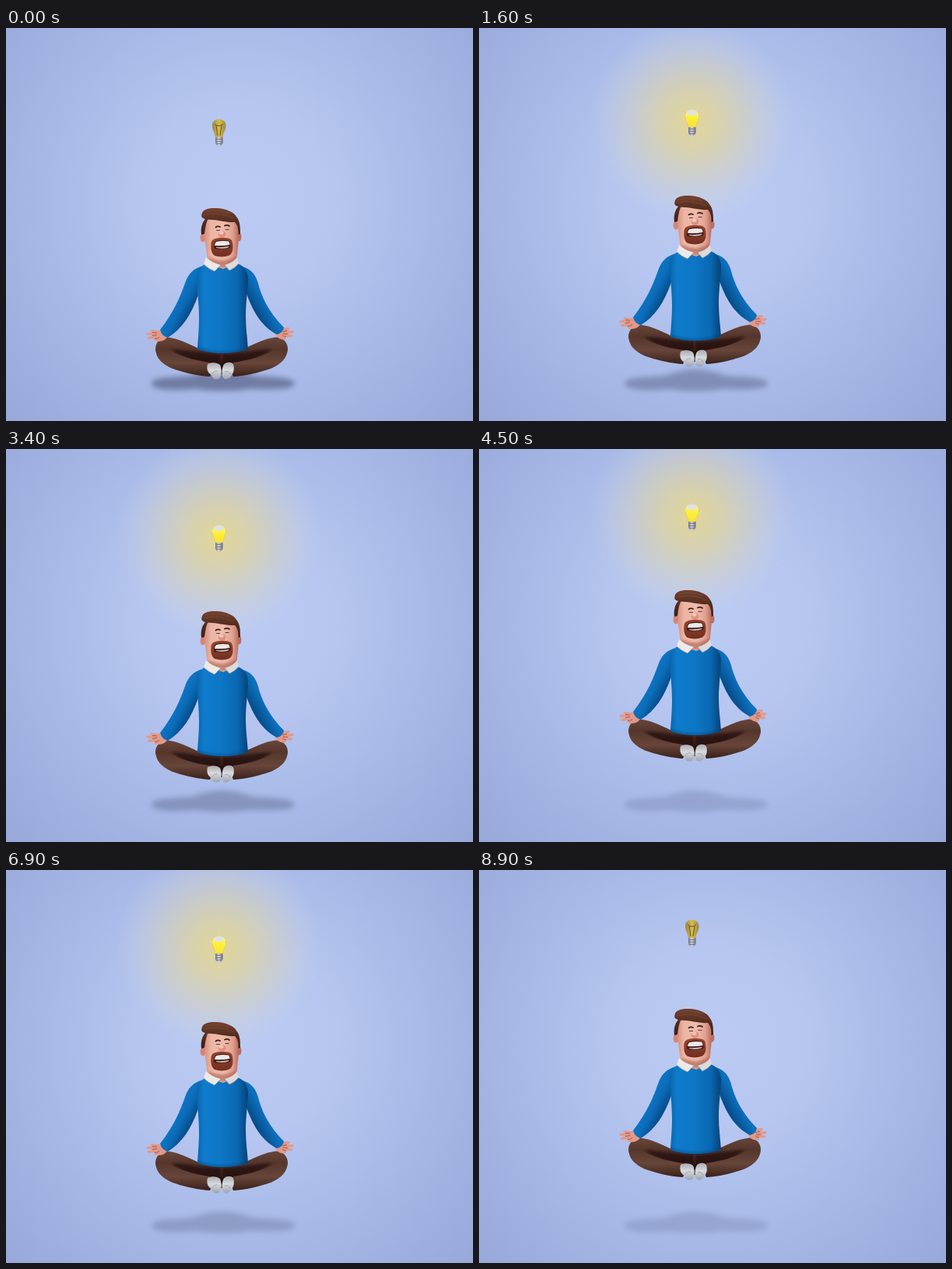
Write an HTML page that moves like this. It is 600 px wide and 504 px high and loops after 9 s.

```html
<!DOCTYPE html>
<html lang="en">
<head>
<meta charset="utf-8">
<title>Levitation</title>
<style>
  html, body { margin: 0; width: 100%; height: 100%; overflow: hidden; }
  body { background: radial-gradient(circle at 50% 44%, #bccbf3 0, #b6c6f0 30%, #a9bae8 58%, #9fb0e0 82%, #97a8d9 100%); }
  svg { display: block; width: 100%; height: 100%; }
  #glow, #lit { animation: shine 9s linear infinite; }
  @keyframes shine {
    0%, 1.2% { opacity: 0; }
    10%, 90% { opacity: 1; }
    97.8%, 100% { opacity: 0; }
  }
</style>
</head>
<body>
<svg viewBox="0 0 600 504">
  <defs>
    <radialGradient id="halo">
      <stop offset="0" stop-color="#ead885" stop-opacity=".84"/>
      <stop offset=".3" stop-color="#e5d694" stop-opacity=".68"/>
      <stop offset=".56" stop-color="#dfd5ae" stop-opacity=".46"/>
      <stop offset=".8" stop-color="#d4d5d2" stop-opacity=".24"/>
      <stop offset="1" stop-color="#c8d3f0" stop-opacity="0"/>
    </radialGradient>
    <linearGradient id="skin">
      <stop offset="0" stop-color="#d58d7c"/>
      <stop offset=".2" stop-color="#ecb5a4"/>
      <stop offset=".55" stop-color="#efbbab"/>
      <stop offset=".82" stop-color="#e0a090"/>
      <stop offset="1" stop-color="#b56a5c"/>
    </linearGradient>
    <linearGradient id="hair" x2="0" y2="1">
      <stop offset="0" stop-color="#74422f"/>
      <stop offset=".5" stop-color="#542d20"/>
      <stop offset="1" stop-color="#3b1f18"/>
    </linearGradient>
    <linearGradient id="beard" x2="0" y2="1">
      <stop offset="0" stop-color="#98452e"/>
      <stop offset="1" stop-color="#702f20"/>
    </linearGradient>
    <linearGradient id="torso">
      <stop offset="0" stop-color="#0a64ac"/>
      <stop offset=".14" stop-color="#0f7bcb"/>
      <stop offset=".5" stop-color="#0d76c5"/>
      <stop offset=".8" stop-color="#0a68b2"/>
      <stop offset="1" stop-color="#064278"/>
    </linearGradient>
    <linearGradient id="armL" x1=".2" y1=".2" x2=".75" y2=".65">
      <stop offset="0" stop-color="#1281d2"/>
      <stop offset=".6" stop-color="#0b6dba"/>
      <stop offset="1" stop-color="#063f76"/>
    </linearGradient>
    <linearGradient id="armR" x1=".8" y1=".2" x2=".25" y2=".65">
      <stop offset="0" stop-color="#0b69b4"/>
      <stop offset=".5" stop-color="#0c71be"/>
      <stop offset="1" stop-color="#063f76"/>
    </linearGradient>
    <linearGradient id="leg" x2="0" y2="1">
      <stop offset="0" stop-color="#68463b"/>
      <stop offset=".45" stop-color="#53342a"/>
      <stop offset="1" stop-color="#2d1812"/>
    </linearGradient>
    <linearGradient id="shin" x2="0" y2="1">
      <stop offset="0" stop-color="#56372c"/>
      <stop offset=".5" stop-color="#67453a"/>
      <stop offset="1" stop-color="#3a211a"/>
    </linearGradient>
    <linearGradient id="sock" x2="0" y2="1">
      <stop offset="0" stop-color="#a9abb0"/>
      <stop offset=".45" stop-color="#d8dade"/>
      <stop offset="1" stop-color="#9da1ad"/>
    </linearGradient>
    <linearGradient id="metal">
      <stop offset="0" stop-color="#73768a"/>
      <stop offset=".45" stop-color="#d3d6e0"/>
      <stop offset="1" stop-color="#6b6e7c"/>
    </linearGradient>
    <linearGradient id="dim">
      <stop offset="0" stop-color="#97874c"/>
      <stop offset=".5" stop-color="#d9ba45"/>
      <stop offset="1" stop-color="#9c8842"/>
    </linearGradient>
    <linearGradient id="bright" x2="0" y2="1">
      <stop offset="0" stop-color="#dcdcd0"/>
      <stop offset=".25" stop-color="#f3ec96"/>
      <stop offset=".45" stop-color="#fff136"/>
      <stop offset="1" stop-color="#f8e23a"/>
    </linearGradient>
    <filter id="soft" x="-20%" y="-60%" width="140%" height="220%"><feGaussianBlur stdDeviation="3.5"/></filter>
    <filter id="smooth" x="-40%" y="-40%" width="180%" height="180%"><feGaussianBlur stdDeviation="1.6"/></filter>

    <path id="glass" d="M265 126C264.500 120 268.500 117 273.500 117S283 120 282.500 126C282 132 279 134 278.500 140H269C268.500 134 265.500 132 265 126Z"/>
    <g id="half">
      <path fill="url(#leg)" d="M252 413C238 407 222 398 207 396.500C197 397 192 404 192 412C193 422 201 430 216 434L278 432V413Z"/>
      <path fill="#23110c" opacity=".7" filter="url(#smooth)" d="M213 412C230 412 250 418 276 418V432C252 430 226 424 213 412Z"/>
      <path fill="url(#shin)" d="M192.500 413C200 411 208 412 216 416C230 423 247 427 262 429Q265 438 262 447C245 446 229 442 213 436.500C199 430 193 423 192.500 413Z"/>
      <path fill="none" stroke="#2b1610" stroke-width="1.200" opacity=".6" d="M262 430Q264.500 438 262 446"/>
    </g>
  </defs>

  <g id="shadow" fill="#465073" filter="url(#soft)">
    <path d="M187 456C187 448 214 448 238 446C256 440 265 438 279 438S304 441 318 446C344 448 371 448 371 456S340 464 314 463Q278 468 244 463C214 466 187 464 187 456Z"/>
  </g>

  <g id="float">
    <circle id="glow" cx="274" cy="136" r="134" fill="url(#halo)"/>
    <g id="bulb">
      <use href="#glass" fill="url(#dim)"/>
      <path d="M270 125l2 13m5-13l-2 13M268 123q6 5 11 0" fill="none" stroke="#5d5436" stroke-width="1"/>
      <g id="lit">
        <use href="#glass" fill="url(#bright)"/>
        <path d="M268 121Q273.500 116.500 279 121L276 125H271Z" fill="#dde1ec"/>
      </g>
      <path d="M269 140H278.500V147.500Q277 151.500 273.700 151.500T269 147.500Z" fill="url(#metal)"/>
      <path d="M269 142.500h9.500M269 145.500h9.500M270 148.500h7.500" stroke="#6a6d7b" stroke-width=".8"/>
    </g>

    <g id="man">
      <path fill="#2b1711" d="M246 408H310L305 434H250Z"/>
      <use href="#half"/>
      <use href="#half" transform="matrix(-1 0 0 1 554 0)"/>

      <path fill="#24130f" d="M263 430H291L286 444H268Z"/>
      <g fill="url(#sock)">
        <path d="M259 431C264 428 272 429 275 432C277.500 438 277.500 446 274 449.500C270 452 265 450 264 445C260 443 257 438 259 431Z"/>
        <path d="M279.500 432C283 428 289 428 292 431C294 438 292 443 290 445C288 449.500 283 452 280 449.500C276.500 446 277 438 279.500 432Z"/>
      </g>
      <path d="M265 444Q267 439 272 440M288 444Q285 439 281 441" fill="none" stroke="#9598a3" stroke-width=".8"/>

      <g fill="#e0998a">
        <path d="M199 387C194 389 190 387 186 387Q184 388.500 188 390L181 391Q178 393 183 394L189 394L182 396.500Q180 398.500 185 399L191 398Q189 401 194 402C199 402 205 401 207 396Z"/>
        <path d="M350 386C355 384 359 385 362 384Q366 384 364 387L360 388.500L368 388Q372 390 367 391.500L362 392L368 394Q370 396 365 396.500L360 396Q361 400 356 399.500C351 399 347 396 346 392Z"/>
      </g>
      <g fill="none" stroke="#b0584a" stroke-width="1">
        <path d="M188 390.500l6 .5M188 394.500l6-1M191 398.500q4 0 6-2"/>
        <path d="M361 388.500l-6 1M362 392.500l-6-.5M360 396q-3 0-5-2"/>
      </g>

      <path fill="url(#armL)" d="M254 305C240 308 234 316 230.500 326C224 344 216 364 198 387Q200 395 208 397C226 386 238 368 247 342L258 316Z"/>
      <path fill="url(#armR)" d="M300 305C314 308 320 315 323.500 326C328 344 337 364 357 384Q356 391 348 393C331 384 319 368 309.500 342L298 316Z"/>
      <path fill="url(#torso)" d="M258 302C250 305 245 311 245 320C245 336 248 350 248 372C248 388 246.500 400 246 412Q277 422 311 412C310 397 308 384 308 370C308 350 311 336 311 320C310 311 306 305 297 302Q277 312 258 302Z"/>
      <path fill="none" stroke="#06407a" stroke-width="3" opacity=".45" filter="url(#smooth)" d="M247 411Q277 421 310 411"/>

      <ellipse cx="253" cy="269" rx="3.500" ry="5.500" fill="#d58675"/>
      <ellipse cx="299.500" cy="268" rx="3" ry="5.500" fill="#bd6c5e"/>
      <path fill="url(#skin)" d="M254.500 254Q257 242 276 242T299 254C300 268 298 280 296 302L279 309L259 302C258 284 254.500 272 254.500 254Z"/>
      <path fill="#8e4032" opacity=".45" filter="url(#smooth)" d="M261 294Q278 303 295 293L296 302L279 308L260 302Z"/>

      <path fill="url(#hair)" d="M251.500 239C252 233 260 230.500 270 231C282 231.500 293 236 296 242C301 248 301 256 301 264L298.500 265C299 257 297 252 294 249C283 250 268 245 259 246C256.500 252 256 257 255 264L251 265C250 257 251.500 250 256 245C252 244 250.500 242 251.500 239Z"/>
      <path d="M254 240Q272 235 293 244M257 236Q274 232 287 238" fill="none" stroke="#87503a" stroke-width="1" opacity=".5"/>

      <path d="M269.500 255.500Q272 253.500 275 255M281 253.500Q284 252 287 254" fill="none" stroke="#3d211b" stroke-width="1.800" stroke-linecap="round"/>
      <path d="M270.500 259.500h4M282 258.500h4" fill="none" stroke="#5a362d" stroke-width="1.100" stroke-linecap="round"/>
      <path fill="url(#beard)" d="M263.500 276C264 270.500 270 269 278 269S290.500 270 291 275C292 282 292 288 287 291.500Q278 295 268 292C263 288 263 282 263.500 276Z"/>
      <path fill="#431a15" d="M270 273Q278 271 286 272.500Q289 274 288.500 281Q288 283 278 283.500T267 282Q267 274 270 273Z"/>
      <path fill="#ece9e7" d="M270.500 274Q278 272.500 286 273.500Q287.500 275 287.500 278Q278 280 268 279Q268.500 275 270.500 274Z"/>
      <path fill="#cfc8c6" d="M269.500 281Q278 281.500 287 280Q286 282.500 278 282.700T269.500 281Z"/>
      <ellipse cx="277.500" cy="264.500" rx="5" ry="4.500" fill="#dc9182"/>
      <ellipse cx="276.500" cy="262.500" rx="3" ry="2.500" fill="#f2c3b4"/>

      <path fill="#eceae8" d="M257 294Q264 301 276 304L268 312Q260 309 254 303Z"/>
      <path fill="#dcdadb" d="M297 294Q292 301 281 304L287 311Q294 308 299 302Z"/>
      <path d="M254 303Q260 309 268 312L276 304M299 302Q294 308 287 311L281 304" fill="none" stroke="#94939b" stroke-width=".7"/>
    </g>
  </g>
</svg>
<script>
  const LOOP = 9000, STEP = 100;
  // time in ms, height above the floor in px
  const path = [[0, 0], [1200, 20], [1600, 16], [2400, 3], [3000, 6], [3400, 23], [4500, 50],
                [5400, 65], [6100, 55], [7200, 33], [7800, 37], [8900, 53], [9000, 54]];
  const el = id => document.getElementById(id);
  const float = el('float'), bulb = el('bulb'), shadow = el('shadow');
  const shine = [el('glow'), el('lit')].flatMap(e => e.getAnimations());
  shine.forEach(a => a.pause());

  const rate = i => (path[i + 1][1] - path[i][1]) / (path[i + 1][0] - path[i][0]);

  // flat at turning points, harmonic mean of the slopes elsewhere
  function tangent(i) {
    if (i === 0 || i === path.length - 1) return 0;
    const a = rate(i - 1), b = rate(i);
    return a * b <= 0 ? 0 : 2 * a * b / (a + b);
  }

  function heightAt(t) {
    let i = 0;
    while (t >= path[i + 1][0]) i++;
    const [t0, y0] = path[i], [t1, y1] = path[i + 1];
    const d = t1 - t0, u = (t - t0) / d, v = 1 - u;
    return v * v * ((1 + 2 * u) * y0 + u * d * tangent(i)) +
           u * u * ((1 + 2 * v) * y1 - v * d * tangent(i + 1));
  }

  const clamp = x => Math.max(0, Math.min(1, x));

  function draw(now) {
    const t = Math.floor(now % LOOP / STEP) * STEP;
    const h = heightAt(t);
    const power = Math.min(clamp((t - 108) / 792), clamp((8802 - t) / 702));
    float.setAttribute('transform', `translate(0 ${-h})`);
    bulb.setAttribute('transform', `translate(0 ${3 * power})`);
    shadow.setAttribute('opacity', .58 * Math.exp(-h / 48));
    shine.forEach(a => { a.currentTime = t; });
    requestAnimationFrame(() => draw(performance.now()));
  }
  draw(performance.now());
</script>
</body>
</html>
```
